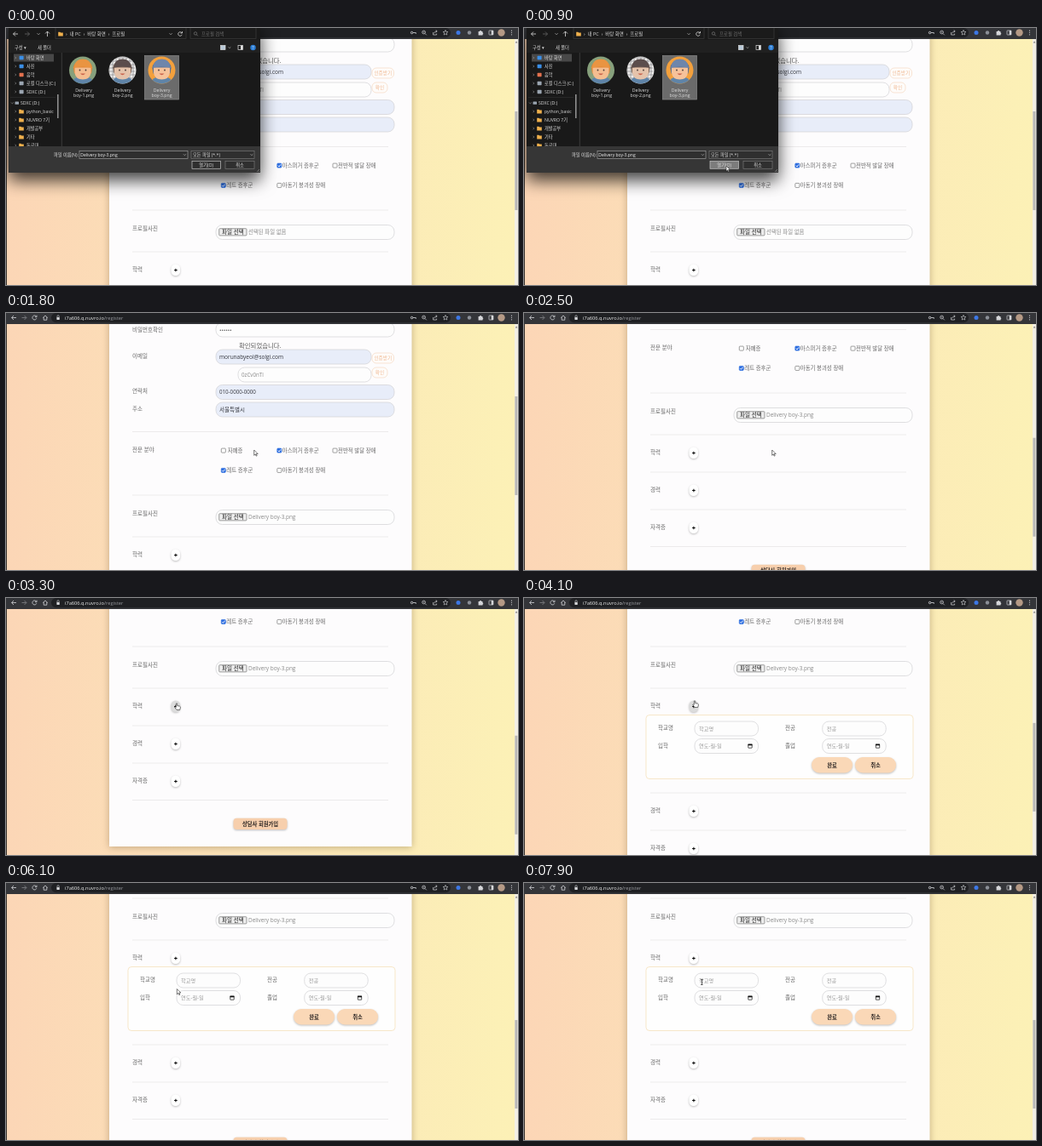
Recreate the animation shown at these times as an HTML page. Size 600 by 302 pixels, loop 8000 ms.

```html
<!DOCTYPE html>
<html lang="ko">
<head>
<meta charset="utf-8">
<title>상담사 회원가입</title>
<style>
html, body { margin: 0; width: 100%; height: 100%; overflow: hidden; background: #fbe3bc; }
svg { display: block; width: 100vw; height: 100vh; }
text { font-family: "Open Sans", "Noto Sans CJK KR", "Noto Sans CJK", sans-serif; white-space: pre; }
#card { filter: drop-shadow(0 1px 4px rgba(90, 60, 20, .35)); }
#dialog { filter: drop-shadow(0 9px 10px rgba(0, 0, 0, .75)); }
.raised { filter: drop-shadow(0 1px 1.2px rgba(0, 0, 0, .25)); }
</style>
</head>
<body>
<svg id="stage" viewBox="0 0 600 302" xmlns="http://www.w3.org/2000/svg"></svg>
<script>
const LOOP = 8000, STEP = 100, PANEL_GROWTH = 79;

// Markup helpers; text is placed by its vertical centre.
const rect = (x, y, w, h, fill, r = 0, stroke = 'none', extra = '') =>
  `<rect x="${x}" y="${y}" width="${w}" height="${h}" rx="${r}" fill="${fill}" stroke="${stroke}" stroke-width=".7" ${extra}/>`;
const text = (x, y, s, fill = '#666', size = 6.5, extra = '') =>
  `<text x="${x}" y="${y + size * .36}" font-size="${size}" fill="${fill}" ${extra}>${s}</text>`;
const mid = (x, y, s, fill, size, weight = 400) =>
  text(x, y, s, fill, size, `text-anchor="middle" font-weight="${weight}"`);
const line = (d, stroke, w = .8, extra = '') =>
  `<path d="${d}" fill="none" stroke="${stroke}" stroke-width="${w}" ${extra}/>`;
const shape = (d, fill, extra = '') => `<path d="${d}" fill="${fill}" ${extra}/>`;
const circle = (x, y, r, fill, extra = '') => `<circle cx="${x}" cy="${y}" r="${r}" fill="${fill}" ${extra}/>`;
const group = (id, body, extra = '') => `<g id="${id}" ${extra}>${body}</g>`;

// Form parts
const rule = y => line(`M148 ${y}H448`, '#e9e6e7', .8);
const field = (x, y, w, fill = '#fdfdfd') => rect(x, y, w, 17, fill, 7.5, '#d2d2d5');
const pill = (x, y, w, s) =>
  rect(x, y, w, 12, '#fefcfa', 5, '#f5d9c2') + mid(x + w / 2, y + 6, s, '#f0b993', 5.6);
const raised = (x, y, w, h, r, fill, s) =>
  `<g class="raised">${rect(x, y, w, h, fill, r)}</g>` + mid(x + w / 2, y + h / 2, s, '#2a2422', 6.3, 700);
const plus = (y, id) =>
  `<g class="raised">${rect(193.5, y - 7, 10.6, 13.6, '#fff', 5.3, 'none', id ? `id="${id}"` : '')}</g>` +
  line(`M197.1 ${y}h3.6M198.9 ${y - 1.8}v3.6`, '#111', 1.1);
const check = (x, y, on, s, gap = 6) =>
  rect(x, y - 2.6, 5, 5, on ? '#2f6fe0' : '#fff', .8, on ? '#2f6fe0' : '#767676') +
  (on ? line(`M${x + 1} ${y}l1.2 1.3 2-2.7`, '#fff', .9) : '') + text(x + gap, y, s, '#666', 6.4);
const calendar = (x, y) =>
  rect(x - 2.2, y - 1.8, 4.4, 4, 'none', .3, '#111') + rect(x - 2.5, y - 2.4, 5, 1.7, '#111');

function pageForm() {
  const blue = '#e8edf9', ink = '#33353c';
  return text(148, 20, '비밀번호확인') + field(246, 11, 209) +
    [0, 1, 2, 3, 4, 5].map(i => circle(251.3 + i * 2.4, 20.3, .75, '#555')).join('') +
    text(273, 38, '확인되었습니다.', '#555', 7.4) +
    text(148, 51, '이메일') + field(246, 43, 182, blue) +
    text(250, 51.5, 'morunabyeol@solgi.com', ink, 6.5) + pill(429, 47, 25.5, '인증받기') +
    field(272, 64, 156) + text(276, 72.5, '0zCv0nTl', '#888', 6.2) + pill(429, 64, 18, '확인') +
    text(148, 92, '연락처') + field(246, 84.5, 209, blue) + text(250, 93, '010-0000-0000', ink, 6.2) +
    text(148, 112.5, '주소') + field(246, 105, 209, blue) + text(250, 113.5, '서울특별시', ink) +
    rule(139.5) + text(148, 161, '전문 분야') +
    check(252.3, 161.7, false, '자폐증', 7.5) + check(317.8, 161.7, true, '아스퍼거 증후군') +
    check(383, 161.7, false, '전반적 발달 장애') +
    check(252.3, 185, true, '레트 증후군') + check(317.8, 185, false, '아동기 붕괴성 장애') +
    rule(214) + text(148, 235.5, '프로필사진') + field(246, 231.5, 209) +
    rect(249.7, 235.7, 32.3, 8.2, '#ececec', 1, '#777') + mid(265.9, 239.7, '파일 선택', '#222', 6.5) +
    text(284, 239.7, '', '#888', 6.4, 'id="fileName"') +
    rule(263) + text(148, 284, '학력') + plus(284.5, 'addSchool');
}

function schoolPanel() {
  const input = (x, y, s) => field(x, y, 74.5) + text(x + 5, y + 8.5, s, '#999', 6.2);
  return rect(143, 294.5, 313, 75, '#fefefe', 4, '#f5deb4') +
    text(157, 310, '학교명') + input(200, 302, '학교명') + text(306, 310, '전공') + input(349.7, 302, '전공') +
    text(157, 330.5, '입학') + input(200, 322.5, '연도-월-일') + calendar(265, 331) +
    text(306, 330.5, '졸업') + input(349.7, 322.5, '연도-월-일') + calendar(414.5, 331) +
    raised(337, 344, 48, 18.5, 9, '#fad8b7', '완료') + raised(388, 344, 48, 18.5, 9, '#fad8b7', '취소');
}

function pageEnd() {
  return rule(307) + text(148, 328, '경력') + plus(328.5) +
    rule(351) + text(148, 372, '자격증') + plus(372.5) + rule(394.5) +
    raised(266.5, 415.7, 63, 13.3, 4, '#f7cfad', '상담사 회원가입');
}

function browserBar() {
  const c = '#d4d5d8';
  return rect(0, 0, 600, 13, '#343539') + rect(53, 0, 468, 11.2, '#1f2023', 5.6) +
    line('M12 5.5H6.8M9 3l-2.5 2.5L9 8', c) +
    line('M18.5 5.5h5.2M21.5 3l2.5 2.5L21.5 8', '#85868a') +
    line('M35.6 4.2A2.5 2.5 0 1 0 35.8 6.3M36 2.7v2h-2', c) +
    line('M43.2 5.6L46 3l2.8 2.6M44.2 5v3.2h3.6V5', c) +
    rect(59.4, 5, 3.4, 3, c, .4) + line('M60 5V3.8a1.1 1.1 0 0 1 2.2 0V5', c, .6) +
    text(69, 5.5, 'i7a606.q.nuvro.io<tspan fill="#95979c">/register</tspan>', '#eceded', 5.7) +
    circle(475.6, 5.5, 1.2, 'none', `stroke="${c}" stroke-width=".9"`) + line('M477 5.5h3.3v1.4', c) +
    circle(489.6, 5, 1.9, 'none', `stroke="${c}" stroke-width=".7"`) + line('M491 6.5l1.8 1.8M488.7 5h1.8', c, .7) +
    line('M500.6 5v3h4V6.6M502 6.2c.2-1.8 1.3-2.4 3-2.4M503.8 2.5l1.4 1.3-1.4 1.3', c, .7) +
    shape('M515 2.4l.8 2 2.1.1-1.6 1.4.5 2.1-1.8-1.1-1.8 1.1.5-2.1-1.6-1.4 2.1-.1z', 'none', `stroke="${c}" stroke-width=".6"`) +
    circle(530, 5.5, 2.5, '#3d78e6') +
    circle(543, 5.5, 2.2, '#8c9098') +
    shape('M553.6 4h1.4a1.1 1.1 0 0 1 2.2 0h1.3v1.4a1.1 1.1 0 0 1 0 2.1v1h-4.9z', c) +
    rect(566, 3, 5, 5, 'none', .6, c) + rect(568.7, 3, 2.3, 5, c) +
    circle(580.5, 5.5, 4.2, '#b59a86') +
    [3.2, 5.5, 7.8].map(y => circle(592.5, y, .6, c)).join('');
}

function folder(x, y) {
  return shape(`M${x - 2.8} ${y - 2.2}h2.2l.8.8h2.6v3.8h-5.6z`, '#efb04c');
}

function avatar(x, y, back, hair, cap, skin) {
  return circle(x, y, 16, back) +
    shape(`M${x - 11} ${y + 11.5}q3-4 11-4t11 4a16 16 0 0 1-22 0z`, '#5f84a8') +
    shape(`M${x - 11} ${y - 2}q0-9 11-9t11 9l-1 6h-20z`, hair) +
    shape(`M${x - 9.5} ${y - 3}h19v6q-1 8-9.5 8t-9.5-8z`, skin) +
    circle(x - 3.5, y, .9, '#4a3a36') + circle(x + 3.5, y, .9, '#4a3a36') +
    shape(`M${x - 3} ${y + 4}q3 3.4 6 0z`, '#c8604a') +
    shape(`M${x - 10} ${y - 4}q1-9 10-9t10 9l2 1.5q-12-3-24 0z`, cap);
}

function dialog() {
  const w = '#dedede', g = '#a5a5a5', s = 5.2;
  const side = [['바탕 화면', 35, '#3a8ee6'], ['사진', 45, '#3a8ee6'], ['음악', 55, '#e3714e'],
    ['로컬 디스크 (C:)', 65, '#9aa5b1'], ['SDXC (D:)', 75, '#9aa5b1']];
  const dirs = ['python_basic', 'NUVRO 7기', '개발공부', '기타', '동글대'];
  const arrow = y => line(`M10.5 ${y - 1.3}l1.3 1.3-1.3 1.3`, g, .6);
  const file = (x, n) => mid(x, 73, 'Delivery', w, s) + mid(x, 79.3, `boy-${n}.png`, w, s);
  let grid = '';
  for (let i = -15; i < 16; i += 4) grid += `M121 ${50 + i}h30M${136 + i} 35v30`;
  return rect(3, -6, 295, 176, '#202020') + rect(3, -6, 295, 20, '#191919') +
    line('M14 7H8.5M11 4.5L8.5 7 11 9.5', w) + line('M22 7h5.5M25 4.5L27.5 7 25 9.5', '#666') +
    line('M36.5 6.2l1.6 1.6 1.6-1.6', g) + line('M48.5 10V4M46 6.5L48.5 4 51 6.5', w) +
    rect(58, -2, 153, 14.5, '#1b1b1b', 0, '#3d3d3d') + folder(64, 7) +
    text(70, 7, '›  내 PC  ›  바탕 화면  ›  프로필', w, 5.5) + line('M191.5 6.2l1.6 1.6 1.6-1.6', g) +
    line('M206 5.8a2.3 2.3 0 1 0 .2 2M206.5 4v2h-2', w) +
    rect(216, -2, 77, 14.5, '#1b1b1b', 0, '#3d3d3d') + circle(222, 6.4, 1.7, 'none', 'stroke="#777" stroke-width=".7"') +
    line('M223.3 7.7l1.5 1.6', '#777') + text(229, 7, '프로필 검색', '#707070', 5.4) +
    text(10, 23, '구성 ▾', w, 5.3) + text(37, 23, '새 폴더', w, 5.3) +
    rect(251.5, 20.5, 5.5, 5, '#b9c9d8', 0, w) + line('M260.5 22.3l1.4 1.4 1.4-1.4', g) +
    rect(272, 20.5, 5.5, 5, 'none', 0, w) + rect(275, 20.5, 2.5, 5, w) + circle(289.5, 23, 3.2, '#2d7fd6') +
    mid(289.5, 23, '?', '#fff', 4.5) +
    rect(3, 29, 295, 111.5, '#191919') + rect(9, 30.5, 47, 9, '#484848') +
    side.map(([n, y, c]) => arrow(y) + rect(15.6, y - 2.2, 5, 4.4, c, .6) + text(24, y, n, w, s)).join('') +
    line('M5 81.5H58', '#333', .6) + line('M6 87.5l1.4 1.4 1.4-1.4', g, .6) + rect(10.5, 86.4, 4.5, 3.4, '#9aa5b1', .6) +
    text(17, 88, 'SDXC (D:)', w, s) +
    dirs.map((n, i) => arrow(98 + i * 10) + folder(18, 98 + i * 10) + text(24, 98 + i * 10, n, w, s)).join('') +
    rect(60, 78, 1.6, 28, '#8f8f8f') + line('M65.3 29V139', '#4a4a4a', .7) +
    rect(162.5, 32.5, 40, 51.5, '#6b6b6b', 0, '#8a8a8a') +
    avatar(90, 49.5, '#86a07c', '#e08434', '#e99442', '#f4bd90') +
    circle(136.5, 49.5, 16, '#ecebea') + line(grid, '#77777a', .6, 'clip-path="url(#disc)"') +
    avatar(136.5, 49.5, 'none', '#7d6558', '#5b4d4c', '#e5c3ab') +
    avatar(182.5, 49.5, '#f3a03c', '#5d7090', '#6e86ab', '#f6c29a') +
    file(91, 1) + file(136.5, 2) + file(182.5, 3) +
    rect(3, 139, 295, 31, '#363636') +
    text(56, 149, '파일 이름(N):', w, s) + rect(86, 144.5, 127, 9, '#2f2f2f', 0, '#9b9b9b') +
    rect(87, 145.4, 43, 7, '#3a83d2', 0, 'none', 'id="nameSelect"') +
    text(87.3, 149, 'Delivery boy-3.png', '#f2f2f2', 5) + line('M208 148.3l1.4 1.4 1.4-1.4', g) +
    rect(217, 144.5, 74, 9, '#2f2f2f', 0, '#777') + text(219, 149, '모든 파일 (*.*)', w, s) +
    line('M286.5 148.3l1.4 1.4 1.4-1.4', g) +
    rect(218, 156.3, 33.5, 9, '#2f2f2f', 0, '#c4c4c4', 'id="openButton"') + mid(234.7, 160.8, '열기(O)', w, s) +
    rect(257, 156.3, 34, 9, '#2f2f2f', 0, '#777') + mid(274, 160.8, '취소', w, s) +
    line('M294 169l3-3M296 169l1-1', '#999', .6);
}

const outline = 'stroke="#222" stroke-width=".6" stroke-linejoin="round"';
const pointers = {
  arrow: shape('M0 0v6.3l1.5-1.4 1 2.2 1-.4-1-2.2h2z', '#fff', outline),
  hand: shape('M-1 -3.5q.8-.8 1.4 0v2.6l3 .6q.9.4.7 1.5L3.4 4H-.2L-2.6.9q.2-1 1.6 0z', '#fff', outline),
  beam: line('M-1.2 -3h2.4M0 -3v6M-1.2 3h2.4', '#222', .7)
};

const stage = document.getElementById('stage');
stage.innerHTML = `<defs>
  <linearGradient id="sky"><stop stop-color="#fcd6b6"/><stop offset=".5" stop-color="#fbe5b8"/><stop offset="1" stop-color="#fcf1b6"/></linearGradient>
  <clipPath id="disc"><circle cx="136.5" cy="49.5" r="16"/></clipPath></defs>` +
  rect(0, 0, 600, 302, 'url(#sky)') +
  group('page', rect(121, -100, 354.5, 549, '#fdfcfd', 0, 'none', 'id="card"') +
    pageForm() + group('panel', schoolPanel()) + group('end', pageEnd())) +
  rect(596, 13, 4, 289, '#f3efe4') + rect(596.4, 99, 3, 116, '#b9b8b5', 0, 'none', 'id="thumb"') +
  shape('M596.8 17.5l1.3-2 1.3 2z', '#777') +
  rect(0, 13, 1, 289, '#3a3430') + browserBar() + group('dialog', dialog()) +
  Object.keys(pointers).map(k => group(k, pointers[k])).join('');

const $ = id => document.getElementById(id);
const set = (id, name, value) => $(id).setAttribute(name, value);
const show = (id, on) => set(id, 'visibility', on ? 'visible' : 'hidden');
const ease = p => p * p * (3 - 2 * p);

// Interpolates rows of [time, ...values].
function along(rows, t) {
  if (t <= rows[0][0]) return rows[0].slice(1);
  for (let i = 1; i < rows.length; i++) {
    const a = rows[i - 1], b = rows[i];
    if (t < b[0]) {
      const p = ease((t - a[0]) / (b[0] - a[0]));
      return a.slice(1).map((v, k) => v + (b[k + 1] - v) * p);
    }
  }
  return rows[rows.length - 1].slice(1);
}

const scrollKeys = [[1800, 0], [2400, 120], [2600, 120], [2900, 157], [4100, 157], [4500, 196]];
const pointerKeys = [[100, 188, 62], [900, 237, 162], [1400, 237, 162], [1800, 290.7, 161],
  [2800, 290.7, 161], [3200, 200.3, 127.5], [3800, 200.3, 127.5], [4100, 200.3, 124.5],
  [6500, 200.3, 124.5], [7100, 208.4, 116.5]];

function draw(t) {
  const open = t >= 3800;
  const [scroll] = along(scrollKeys, t), [x, y] = along(pointerKeys, t);
  const grow = open ? PANEL_GROWTH : 0;
  set('page', 'transform', `translate(0 ${-scroll})`);
  set('end', 'transform', `translate(0 ${grow})`);
  set('card', 'height', 549 + grow);
  show('panel', open);
  set('thumb', 'y', 18 + (197 + scroll) * (open ? .364 : .406));
  set('thumb', 'height', open ? 104 : 116);
  $('fileName').textContent = t < 1500 ? '선택된 파일 없음' : 'Delivery boy-3.png';
  set('addSchool', 'fill', t >= 3200 && t < 4200 ? '#dcdcdc' : '#fff');

  const gone = Math.min(1, Math.max(0, (t - 1200) / 200)), k = 1 - .11 * gone;
  show('dialog', gone < 1);
  set('dialog', 'opacity', (1 - gone) ** 1.4);
  set('dialog', 'transform', `translate(140 74) scale(${k}) translate(-140 -74)`);
  set('openButton', 'fill', t >= 800 ? '#7c7c7c' : '#2f2f2f');
  set('nameSelect', 'visibility', t >= 1200 && gone < 1 ? 'inherit' : 'hidden');

  const kind = t >= 3200 && t < 4200 ? 'hand' : t >= 6800 ? 'beam' : 'arrow';
  for (const id in pointers) {
    show(id, id === kind && t >= 100);
    set(id, 'transform', `translate(${x} ${y})`);
  }
}

const start = performance.now();
function tick(now) {
  const t = Math.max(0, now - start) % LOOP;
  draw(Math.floor(t / STEP) * STEP);
  requestAnimationFrame(tick);
}
draw(0);
requestAnimationFrame(tick);
</script>
</body>
</html>
```
